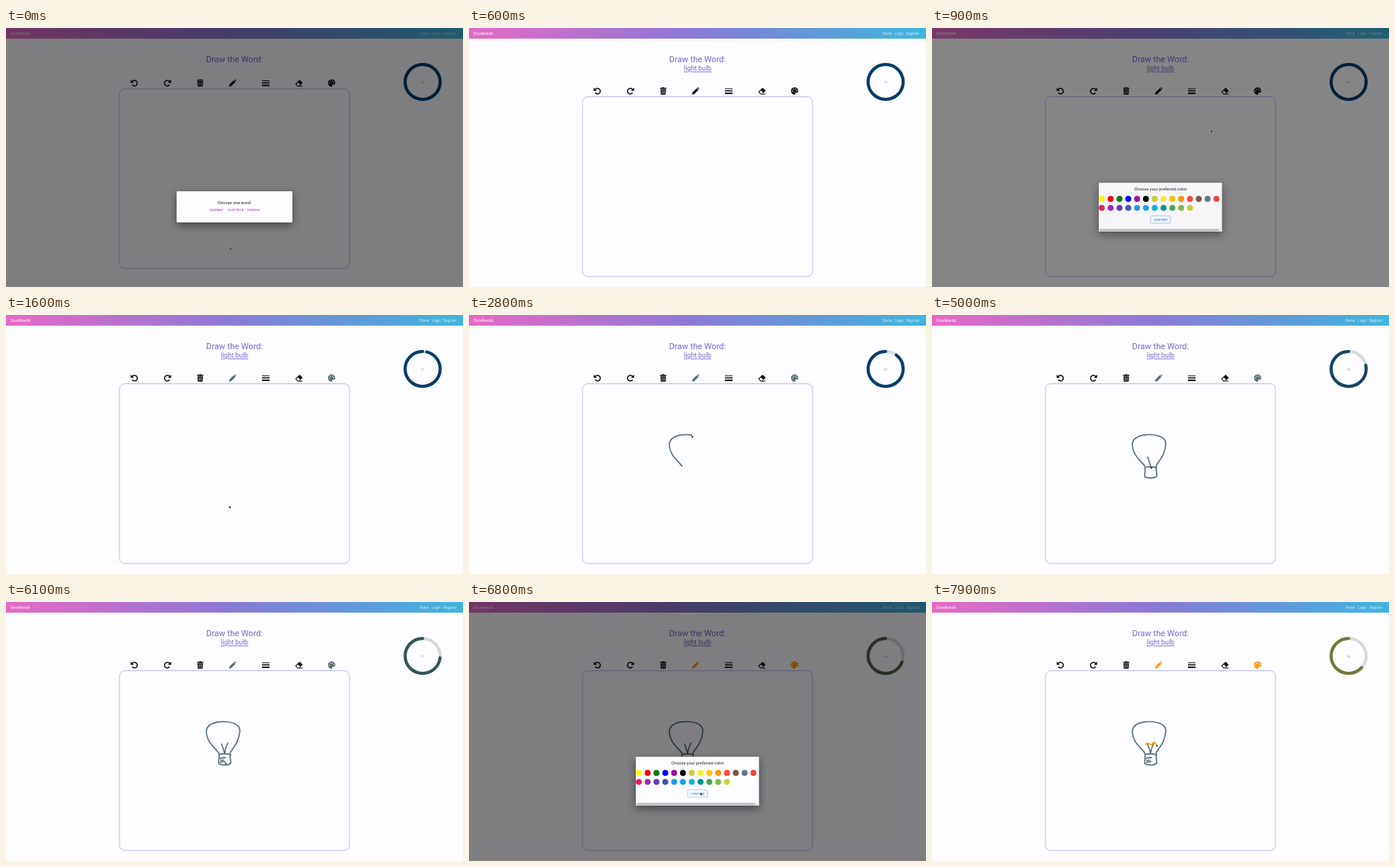
An HTML page that plays this animation: 600 by 341 pixels, repeating every 8 s.

```html
<!DOCTYPE html>
<html lang="en">
<head>
<meta charset="utf-8">
<title>Draw the Word</title>
<style>
html, body { margin: 0; width: 100%; height: 100%; overflow: hidden; background: #fdfcff; }
svg { display: block; width: 100%; height: 100%; font-family: Roboto, "Open Sans", sans-serif; }
.mid { text-anchor: middle; }
.modal { filter: drop-shadow(0 4px 6px rgba(0, 0, 0, .45)); }
.stroke { fill: none; stroke-linecap: round; stroke-linejoin: round; stroke-width: 1.6; }
.line { fill: none; stroke: currentColor; }
.hole { fill: #fdfcff; }
#tools { fill: currentColor; color: #101014; }
</style>
</head>
<body>
<svg viewBox="0 0 600 341" preserveAspectRatio="none">
  <defs>
    <linearGradient id="sky">
      <stop offset="0" stop-color="#e869c5"/>
      <stop offset=".48" stop-color="#8b79d6"/>
      <stop offset="1" stop-color="#3eb5de"/>
    </linearGradient>
  </defs>
  <rect width="600" height="341" fill="#fdfcff"/>
  <rect width="600" height="14" fill="url(#sky)"/>
  <g fill="#fff">
    <text x="6" y="8.7" font-size="5">Doodlewick</text>
    <g class="mid" font-size="4.7" opacity=".75">
      <text x="549" y="8.6">Home</text>
      <text x="565" y="8.6">Login</text>
      <text x="582.7" y="8.6">Register</text>
    </g>
  </g>
  <g class="mid" fill="#7568cf">
    <text x="300" y="45.4" font-size="11">Draw the Word:</text>
    <text id="word" x="300" y="56.4" font-size="8.8" text-decoration="underline">light bulb</text>
  </g>
  <g id="board">
    <g id="tools">
      <g transform="translate(168.5 83)">
        <path class="line" stroke-width="1.5" d="M-3.2-1.4A3.7 3.7 0 1 1-2.8 2.3"/>
        <path d="M-4.8-4.6V-.3H-.5Z"/>
      </g>
      <g transform="translate(212 83) scale(-1 1)">
        <path class="line" stroke-width="1.5" d="M-3.2-1.4A3.7 3.7 0 1 1-2.8 2.3"/>
        <path d="M-4.8-4.6V-.3H-.5Z"/>
      </g>
      <g transform="translate(255 83)">
        <path d="M-4.2-4.2h2.6l.6-.7h2l.6.7h2.6v1.2H-4.2zM-3.6-2.4h7.2L3.2 4.8H-3.2z"/>
        <path d="M-1.6-1.2v4.8M0-1.2v4.8M1.6-1.2v4.8" stroke="#fdfcff" stroke-width=".5"/>
      </g>
      <g class="tint" transform="translate(297.5 83)">
        <path d="M-4.7 4.7L-4 1.7 1.5-3.8 3.8-1.5-1.7 4zM2.1-4.4Q3-5.2 3.9-4.4L4.5-3.8Q5.2-3 4.4-2.1z"/>
      </g>
      <path transform="translate(341 83)" d="M-5-3.5H5v.9H-5zM-5-1.1H5V.4H-5zM-5 1.9H5V4H-5z"/>
      <g transform="translate(384.5 83)">
        <path d="M-4.8 1.1L.5-4.1Q1-4.6 1.5-4.1L4.6-1Q5-.5 4.6 0L1.2 3.4H4.8V4.4H-1.7z"/>
        <path class="hole" d="M-3.3 1.2L-1.3-.7 1.6 2.1 .3 3.4H-1.2z"/>
      </g>
      <g class="tint" transform="translate(427.5 83)">
        <path d="M0-4.8A4.8 4.8 0 1 0 0 4.8C1.8 4.8.3 2.8 1.3 2H3.2C4.3 2 4.8 1 4.8 0 4.8-2.8 2.7-4.8 0-4.8z"/>
        <g class="hole">
          <circle cx="-2.9" cy=".3" r=".75"/><circle cx="-1.5" cy="-2.3" r=".75"/>
          <circle cx="1.3" cy="-2.5" r=".75"/><circle cx="3" cy="-.4" r=".75"/>
        </g>
      </g>
    </g>
    <rect x="149" y="90.5" width="302" height="236.7" rx="7" fill="none" stroke="#c3bbee"/>
  </g>
  <g id="ink"></g>
  <g fill="none" stroke-width="4" transform="rotate(-90 547 71)">
    <circle cx="547" cy="71" r="23" stroke="#d9d9d9"/>
    <circle id="ring" cx="547" cy="71" r="23" pathLength="70" stroke-linecap="round"/>
  </g>
  <text id="count" class="mid" x="547" y="72.5" font-size="4.2" fill="#a79fdc"></text>
  <rect id="shade" width="600" height="341"/>
  <g id="words" class="modal mid">
    <rect x="224" y="215" width="152" height="41" rx=".8" fill="#fdfcff"/>
    <text x="300" y="232.4" font-size="5.6" fill="#222">Choose one word:</text>
    <g font-size="3.9" fill="#9c27b0">
      <text x="276.5" y="241.3">DOORMAT</text>
      <text x="301.5" y="241.3">LIGHT BULB</text>
      <text x="325" y="241.3">DRAGON</text>
    </g>
  </g>
  <g id="colors" class="modal mid">
    <rect x="219" y="203.7" width="161.7" height="64.3" rx=".8" fill="#fdfcff"/>
    <text x="300" y="214" font-size="5.6" fill="#222">Choose your preferred color</text>
    <g id="dots"></g>
    <rect x="287" y="247.3" width="26" height="9.6" rx="1" fill="none" stroke="#8dbbe6" stroke-width=".7"/>
    <text x="300" y="253.6" font-size="4.1" fill="#1976d2">CONFIRM</text>
    <rect x="219" y="264" width="161.7" height="4" fill="#eeeef0"/>
    <rect x="220" y="264.7" width="156.5" height="2.6" rx="1.3" fill="#bcbcc0"/>
  </g>
  <path id="cursor" d="M0 0V3.6L.9 2.9 1.5 4.1 2.1 3.8 1.6 2.6H2.7Z" fill="#000" stroke="#fff" stroke-width=".25"/>
</svg>
<script>
const LOOP = 8000, STEP = 100, SECONDS = 70;
const SLATE = '#566e7a', ORANGE = '#ff9800';
const $ = id => document.getElementById(id);
const clamp = v => Math.min(1, Math.max(0, v));

function add(parent, tag, attrs) {
  const el = document.createElementNS('http://www.w3.org/2000/svg', tag);
  for (const k in attrs) el.setAttribute(k, attrs[k]);
  return parent.appendChild(el);
}

// Linear value between rows of [time, value, ...]
function track(rows, t, col = 1) {
  const i = rows.findIndex(r => r[0] > t);
  if (i < 0) return rows[rows.length - 1][col];
  if (i === 0) return rows[0][col];
  const a = rows[i - 1], b = rows[i];
  return a[col] + (b[col] - a[col]) * (t - a[0]) / (b[0] - a[0]);
}

const swatches = [
  'ffff00 ff0000 0a7a0a 0000ff a0109c 000000 cdcc3a ffeb3b ffc107 ff9800 ff4a35 795548 647687 f44336',
  'e91e63 9c27b0 673ab7 3f51b5 2196f3 17a2ee 12b4d4 009688 43a84c 7fbc42 c8d436'
];
swatches.forEach((row, y) => row.split(' ').forEach((c, x) =>
  add($('dots'), 'circle', { cx: 223 + x * 11.57, cy: 225 + y * 11.8, r: 3.9, fill: '#' + c })));

const strokes = [
  [2000, 3900, 'M279.5 199C275 192 263.5 186 263 170C263.5 161 275 157 286 157.5C299 158 307 162 307 170C306 184 299 191 294.5 198C293 203 295.5 207 295 212.5C291 215.5 283 215 279.5 213C278.5 209 280.5 205 279.7 200.5'],
  [4200, 4500, 'M279.5 200.5Q288 199 295 201'],
  [4600, 4900, 'M283 187Q285 192 287 199'],
  [5000, 5300, 'M287 199Q288 192 291.3 185.5'],
  [5400, 5600, 'M281 206Q284 205 288 204.9'],
  [5700, 5850, 'M282 208.6L286 208.2'],
  [5900, 6100, 'M281.5 211.2Q285 209.8 287.5 210.4'],
  [7300, 7900, 'M280.7 187.5Q283 184.5 285.5 187T290 186T294.3 187', ORANGE]
].map(([from, to, d, color = SLATE]) => {
  const el = add($('ink'), 'path', { d, class: 'stroke', stroke: color, pathLength: 1 });
  return { from, to, el, length: el.getTotalLength() };
});

const clock = [[800, 70], [1600, 67.3], [3900, 58.6], [6100, 51.3], [6800, 48.5], [7900, 44.3]];
const wordFade = [[200, 1], [400, 0]];
const colorFade = [[600, 0], [900, .95], [1000, 1], [1400, 1], [1600, 0], [6200, 0], [6500, 1], [6900, 1], [7100, 0]];

const moves = [
  [0, 294, 289], [200, 301, 241], [300, 301, 241], [600, 427, 83], [700, 425, 86], [900, 366, 134],
  [1100, 362, 225], [1200, 362, 225], [1400, 300, 252], [1600, 293, 251], [1900, 281, 205],
  [6100, 287, 210], [6200, 427, 83], [6400, 400, 120], [6600, 327, 225], [6750, 304, 251],
  [6900, 304, 251], [7200, 281, 190]
];
strokes.forEach(s => [[s.from, 0], [s.to, s.length]].forEach(([time, at]) => {
  const p = s.el.getPointAtLength(at);
  moves.push([time, p.x, p.y]);
}));
moves.sort((a, b) => a[0] - b[0]);

function cursorAt(t) {
  const s = strokes.find(s => t >= s.from && t <= s.to);
  if (s) return s.el.getPointAtLength(s.length * (t - s.from) / (s.to - s.from));
  return { x: track(moves, t, 1), y: track(moves, t, 2) };
}

function ringColor(left) {
  const p = clamp((57 - left) / 27), end = [247, 184, 1];
  return `rgb(${[0, 60, 108].map((v, i) => Math.round(v + (end[i] - v) * p))})`;
}

function draw(t) {
  const chosen = t >= 300;
  $('word').style.display = chosen ? '' : 'none';
  $('board').setAttribute('transform', `translate(0 ${chosen ? 0 : -10.5})`);

  const left = track(clock, t);
  $('ring').style.stroke = ringColor(left);
  $('ring').style.strokeDasharray = `${left} ${SECONDS}`;
  $('ring').style.strokeDashoffset = left - SECONDS;
  $('count').textContent = Math.floor(left);

  const tint = t >= 6650 ? ORANGE : t >= 1200 ? SLATE : '#101014';
  document.querySelectorAll('.tint').forEach(el => el.style.fill = tint);

  const w = track(wordFade, t), c = track(colorFade, t);
  $('words').style.opacity = w;
  $('colors').style.opacity = c;
  $('shade').style.opacity = Math.max(w, c) * .5;

  for (const s of strokes) {
    const p = clamp((t - s.from) / (s.to - s.from));
    s.el.style.visibility = p > 0 ? 'visible' : 'hidden';
    s.el.style.strokeDasharray = p < 1 ? `${p} 2` : 'none';
  }
  const { x, y } = cursorAt(t);
  $('cursor').setAttribute('transform', `translate(${x} ${y})`);
}

const start = performance.now();
function tick() {
  const t = (performance.now() - start) % LOOP;
  draw(Math.floor(t / STEP) * STEP);
  requestAnimationFrame(tick);
}
tick();
</script>
</body>
</html>
```
